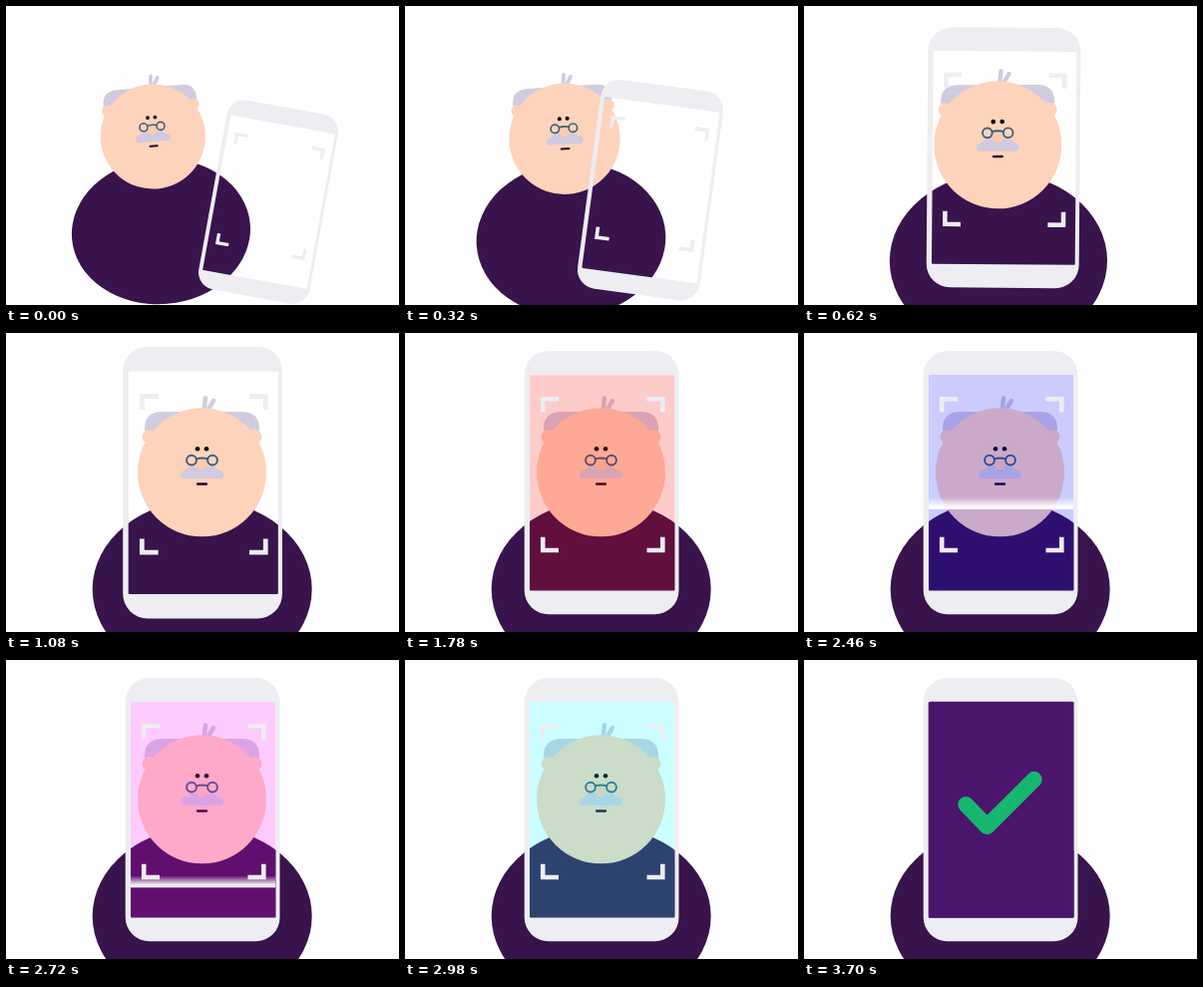
Write an HTML page that moves like this. It is 394 px wide and 300 px high and loops after 4.18 s.

```html
<!DOCTYPE html>
<html lang="en">
<head>
<meta charset="utf-8">
<title>Face scan</title>
<style>
  html, body { margin: 0; width: 100%; height: 100%; overflow: hidden; background: #fefefe; }
  svg { display: block; width: 100%; height: 100%; }
</style>
</head>
<body>
<svg viewBox="0 0 394 300">
  <defs>
    <clipPath id="screenClip"><rect x="125" y="42" width="145.5" height="216.5" rx="1.5"/></clipPath>
    <linearGradient id="beam" x2="0" y2="1">
      <stop offset="0" stop-color="#fff" stop-opacity="0"/>
      <stop offset=".75" stop-color="#fff" stop-opacity=".9"/>
      <stop offset="1" stop-color="#fff"/>
    </linearGradient>
  </defs>

  <g id="person">
    <ellipse cx="196.7" cy="257" rx="110" ry="89.5" fill="#39134b"/>
    <path d="M139 98V96Q139 79 157 79H236Q254 79 254 96V98Z" fill="#d1cbdf"/>
    <path d="M198.6 77L200 65.2M202.5 77L208 68" stroke="#d1cbdf" stroke-width="4.4" stroke-linecap="round"/>
    <g fill="#fed3bb">
      <circle cx="143.5" cy="104" r="7"/>
      <circle cx="249.5" cy="104" r="7"/>
      <circle cx="196.5" cy="139.8" r="64.5"/>
    </g>
    <circle cx="192" cy="116.3" r="2.3"/>
    <circle cx="201" cy="116.3" r="2.3"/>
    <path d="M179 146Q174.500 146 175 141.500Q176.500 137.500 181 137Q184 133 189 133.500H204Q209 133 212 137Q217 137.500 218 141.500Q218.500 146 214 146Z" fill="#d1cbdf"/>
    <circle cx="196.5" cy="132" r="5.6" fill="#fdcbb0"/>
    <g fill="none" stroke="#37607f" stroke-width="1.9">
      <circle cx="186" cy="127.6" r="4.9"/>
      <circle cx="207" cy="127.6" r="4.9"/>
      <path d="M190.700 126.200Q196.500 124.800 202.300 126.200"/>
    </g>
    <path d="M192 151.500H201" stroke="#1d0a2c" stroke-width="2.3" stroke-linecap="round"/>
  </g>

  <rect id="tint" x="125" y="42" width="145.5" height="216.5" fill-opacity=".2"/>
  <g clip-path="url(#screenClip)">
    <rect id="line" x="125" width="145.5" height="12" fill="url(#beam)"/>
  </g>

  <g id="phone">
    <path fill="#ededf2" fill-rule="evenodd" d="M144 18H250A24 24 0 0 1 274.500 42V258A24 24 0 0 1 250 282.300H144A24 24 0 0 1 119.700 258V42A24 24 0 0 1 144 18ZM126 42Q125 42 125 43V257.500Q125 258.500 126 258.500H269.500Q270.500 258.500 270.500 257.500V43Q270.500 42 269.500 42Z"/>
    <path fill="none" stroke="#ededf2" stroke-width="4.6" d="M138.200 79.500V66.300H154M242.500 66.300H258.300V79.500M138.200 204.800V218H154M242.500 218H258.300V204.800"/>
  </g>

  <g id="result">
    <rect x="124.700" y="41.800" width="145.900" height="216.900" rx="1.5" fill="#4b156d"/>
    <path id="check" d="M162.300 145L183.500 167L230.700 119.800" fill="none" stroke="#17b670" stroke-width="16" stroke-linecap="round" stroke-linejoin="round"/>
  </g>
</svg>

<script>
  const LOOP = 4180;
  const ENTER = 800;
  const PULSE = { start: 880, half: 450, amount: 0.09 };
  const SCAN = { start: 1780, speed: 0.198, top: 42, height: 12 };
  const TINT_STEP = 240;
  const TINTS = ["#f00", "#0f0", "#00f", "#f0f", "#ff0", "#0ff"];
  const DONE = 3460;
  const CHECK = 3700;

  const personPose = { pivot: [196.5, 139.8], from: [147.3, 131], angle: -4.8, scale: 0.815 };
  const phonePose = { pivot: [197.1, 150.2], from: [263, 196.6], angle: 10.3, scale: 0.73 };

  const el = id => document.getElementById(id);
  const [person, phone, tint, line, result, check] =
    ["person", "phone", "tint", "line", "result", "check"].map(el);

  const clamp = p => Math.min(1, Math.max(0, p));
  const mix = (a, b, p) => a + (b - a) * p;
  const ease = p => p < 0.5 ? 4 * p ** 3 : 1 - 4 * (1 - p) ** 3;
  const show = (node, visible) => node.setAttribute("visibility", visible ? "visible" : "hidden");

  function place(node, { pivot, from, angle, scale }, p, zoom = 1) {
    const [x, y] = pivot.map((v, i) => mix(from[i], v, p));
    node.setAttribute("transform",
      `translate(${x} ${y}) rotate(${mix(angle, 0, p)}) scale(${mix(scale, 1, p) * zoom}) translate(${-pivot[0]} ${-pivot[1]})`);
  }

  function draw(t) {
    const p = ease(clamp(t / ENTER));
    const beat = (t - PULSE.start) / PULSE.half;
    const zoom = 1 + PULSE.amount * ease(clamp(1 - Math.abs(beat - 1)));
    place(person, personPose, p);
    place(phone, phonePose, p, zoom);

    const scanTime = t - SCAN.start;
    tint.setAttribute("fill", TINTS[Math.floor(scanTime / TINT_STEP)] || "none");
    line.setAttribute("y", SCAN.top - SCAN.height + Math.max(0, scanTime) * SCAN.speed);
    show(line, scanTime >= 0 && t < DONE);

    show(result, t >= DONE);
    show(check, t >= CHECK);
  }

  const begin = performance.now();
  function tick() {
    draw((performance.now() - begin) % LOOP);
    requestAnimationFrame(tick);
  }
  draw(0);
  requestAnimationFrame(tick);
</script>
</body>
</html>
```
